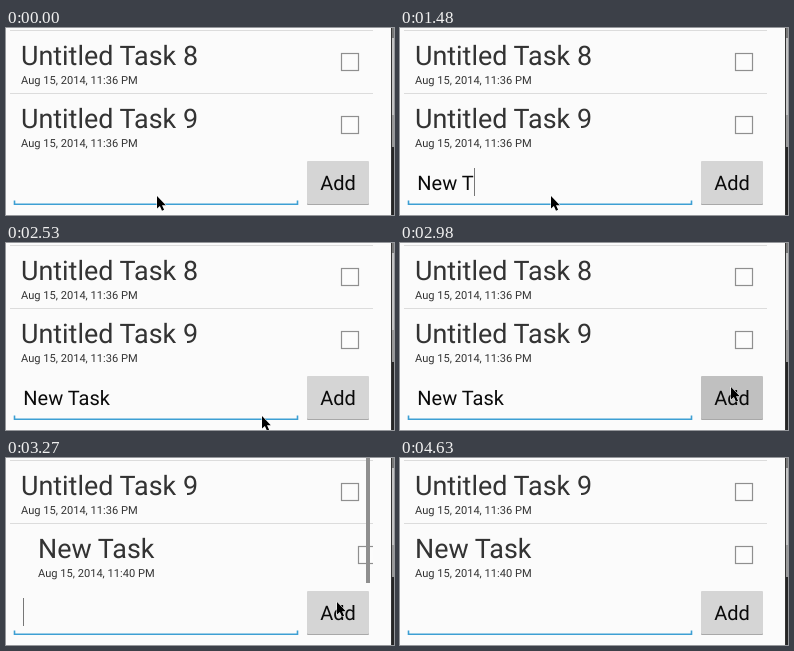
Recreate the animation shown at these times as an HTML page. Size 388 px wide and 187 px high, loop 4680 ms.

```html
<!DOCTYPE html>
<html lang="en">
<head>
<meta charset="utf-8">
<title>Adding a task</title>
<style>
  html, body { margin: 0; width: 100%; height: 100%; overflow: hidden; background: #fbfbfb; }
  svg { display: block; width: 388px; height: 187px; }
  text { font-family: Roboto, "Liberation Sans", sans-serif; white-space: pre; text-rendering: geometricPrecision; }
  .title { font-size: 26.9px; fill: #333; }
  .date { font-size: 11.1px; fill: #333; }
  .label { font-size: 20px; fill: #0a0a0a; }
  .rule { fill: #dcdcdc; }
  .box { fill: #fcfcfc; stroke: #8f8f8f; stroke-width: 1.2; }
</style>
</head>
<body>
<svg viewBox="0 0 388 187">
  <defs>
    <clipPath id="listArea"><rect x="4" width="363" height="127"/></clipPath>
  </defs>
  <rect width="388" height="187" fill="#fbfbfb"/>

  <g clip-path="url(#listArea)">
    <g id="list"></g>
    <rect id="bar" x="360" width="4" height="125" fill="#8f8f8f"/>
  </g>

  <rect x="386" width="2" height="187" fill="#c4c4c4"/>
  <rect x="386" width="2" height="10" fill="#777"/>
  <rect x="386" y="87" width="2" height="32" fill="#999"/>
  <rect x="386" y="119" width="2" height="68" fill="#262626"/>
  <rect x="385" width="1" height="187" fill="#333"/>

  <path d="M8.5 172.5V176.3H291.5V172.5" fill="none" stroke="#3d9fd3" stroke-width="1.6"/>
  <text id="entry" class="label" x="17.3" y="162"></text>
  <rect id="caret" y="140" width="1" height="28" fill="#777"/>

  <rect x="301" y="134" width="62" height="43" rx="1" fill="#a8a8a8"/>
  <rect id="button" x="301" y="133" width="62" height="43" rx="1"/>
  <text class="label" x="332" y="162" text-anchor="middle">Add</text>

  <path id="pointer" d="M0 0V12.6L2.9 10L5 14.8L7.1 13.8L5 9.2H8.8Z"
        fill="#000" stroke="#fff" paint-order="stroke"/>
</svg>
<script>
const LOOP = 4680, BEAT = 149, LEAD = 12;
const ROW = 63, TEXT_X = 17.3, WORD = "New Task";
// Moments of the story, counted in beats.
const TYPE = 6, PAUSE = 11, TYPED = 14, PRESS = 20, LEAVE = 24, GONE = 27;

const $ = id => document.getElementById(id);
const clamp = x => Math.min(1, Math.max(0, x));
const smooth = p => p * p * (3 - 2 * p);
const easeOut = p => 1 - (1 - p) ** 2;
const mod = (a, n) => ((a % n) + n) % n;
const move = (id, x, y) => $(id).setAttribute("transform", `translate(${x} ${y})`);

const row = (title, time, i, id) => `
  <g transform="translate(0 ${i * ROW})">
    <rect class="rule" x="4" y="2" width="363" height="1"/>
    <g id="${id}">
      <text class="title" x="15" y="37.3">${title}</text>
      <text class="date" x="15" y="56">Aug 15, 2014, ${time} PM</text>
      <rect class="box" x="335.5" y="25.5" width="17" height="17"/>
    </g>
  </g>`;

$("list").innerHTML =
  row("Untitled Task 8", "11:36", 0, "first") +
  row("Untitled Task 9", "11:36", 1, "second") +
  row(WORD, "11:40", 2, "added");

function typed(beat) {
  if (beat < TYPE || beat > PRESS) return "";
  return WORD.slice(0, beat - TYPE + 1 - (beat >= PAUSE));
}

function caretOn(beat) {
  if (beat >= TYPED && beat <= PRESS) return false;
  return (beat >= TYPE && beat < TYPED) || mod(beat - 20.5, 6.4) < 3.2;
}

// Swings below the straight line to the button, then drops away.
function pointerAt(beat) {
  const e = smooth(clamp((beat - TYPED) / 5) ** 1.15);
  const out = easeOut(clamp((beat - LEAVE) / 2));
  const dip = 121 * e * (1 - e) ** 1.5;
  return [151 + 180 * e + 20 * out, 168 - 24 * e + dip + 38 * out].map(Math.round);
}

function render(t) {
  const beat = Math.floor((t + LEAD) / BEAT);

  const entry = $("entry");
  entry.textContent = typed(beat);
  const width = entry.textContent ? entry.getComputedTextLength() : 0;
  $("caret").setAttribute("x", Math.round(TEXT_X + width));
  $("caret").style.opacity = Number(caretOn(beat));

  $("button").setAttribute("fill", beat === PRESS ? "#c0c0c0" : "#d5d5d5");
  move("list", 0, -ROW * easeOut(clamp((beat - PRESS) / 2)));
  move("added", Math.round(459 * (1 - clamp((beat - PRESS) / 3)) ** 3), 0);
  $("bar").style.opacity = beat > PRESS ? clamp((LEAVE + 1 - beat) / 2) : 0;

  $("pointer").style.display = beat < GONE ? "" : "none";
  move("pointer", ...pointerAt(beat));
}

const begin = performance.now();
function tick() {
  render((performance.now() - begin) % LOOP);
  requestAnimationFrame(tick);
}
tick();
</script>
</body>
</html>
```
